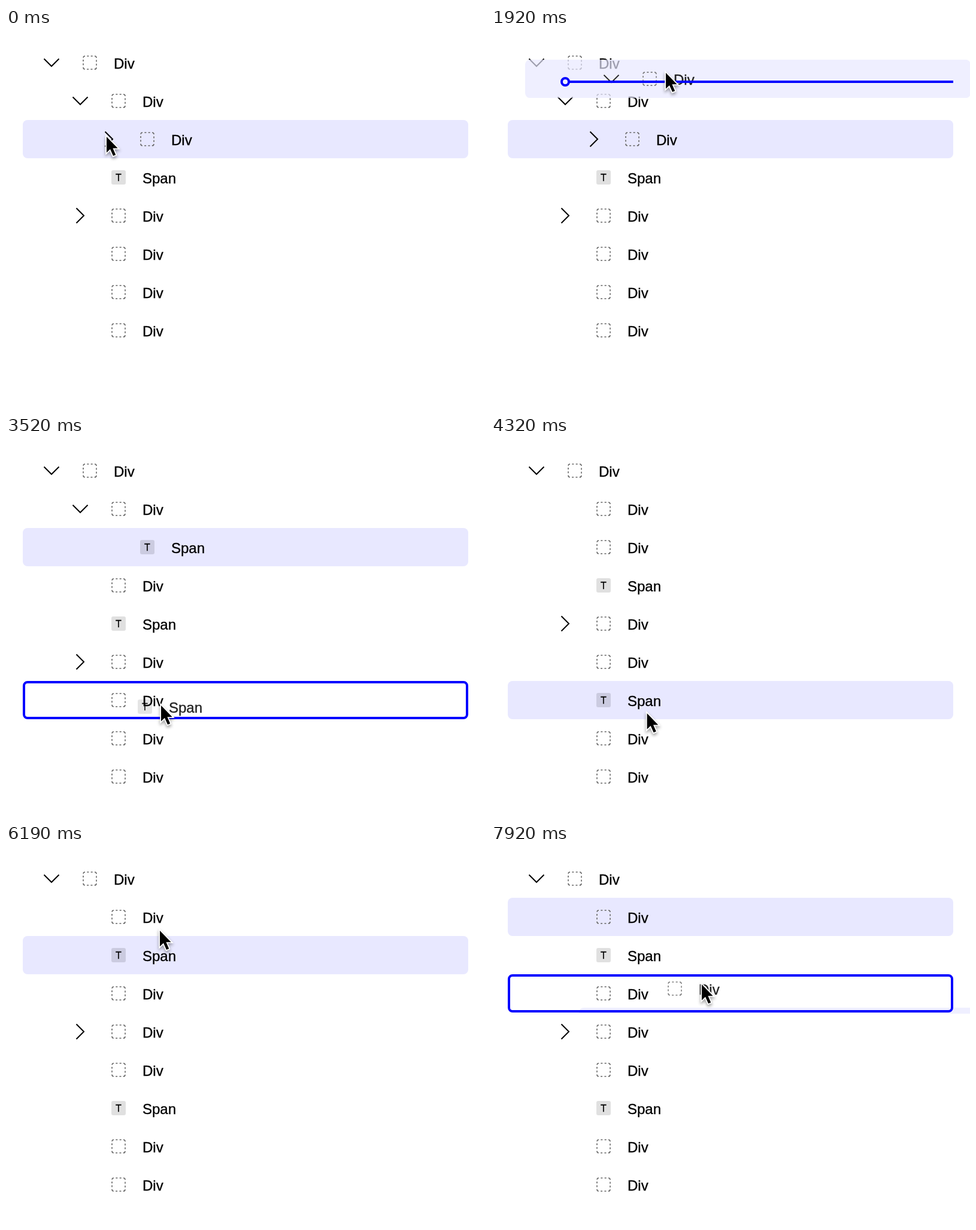
An HTML page with a canvas that plays this animation: 800x636 px, repeating every 7.99 s.

```html
<!DOCTYPE html>
<html lang="en">
<head>
<meta charset="utf-8">
<title>Tree drag and drop</title>
<style>
  html, body { margin: 0; width: 100%; height: 100%; overflow: hidden; background: #fff; }
  canvas { display: block; }
</style>
</head>
<body>
<canvas id="stage" width="800" height="636"></canvas>
<script>
const ctx = document.getElementById('stage').getContext('2d');
const LOOP = 7990, STEP = 200 / 3;
const ROW = 64, TOP = 26, LEFT = 28, WIDTH = 744, INDENT = 48;

// Each row: depth, chevron (v open, > closed, - none), kind (D or S)
const trees = [
  [0, '0vD 1vD 2>D 1-S 1>D 1-D 1-D 1-D'],
  [185, '0vD 1vD 2vD 3-S 1-S 1>D 1-D 1-D 1-D'],
  [1430, '0vD 1vD 2>D 1-S 1>D 1-D 1-D 1-D'],
  [2185, '0vD 1vD 2-S 1-D 1-S 1>D 1-D 1-D 1-D'],
  [4255, '0vD 1-D 1-D 1-S 1>D 1-D 1-S 1-D 1-D'],
  [6185, '0vD 1-D 1-S 1-D 1>D 1-D 1-S 1-D 1-D'],
].map(([time, rows]) => ({ time, rows: rows.split(' ') }));

// fade: milliseconds the highlight takes to move to the new row
const selections = [
  { time: 0, row: 2, fade: 1 },
  { time: 2185, row: 1, fade: 1 },
  { time: 3320, row: 2, fade: 200 },
  { time: 4255, row: 6, fade: 1 },
  { time: 5390, row: 3, fade: 200 },
  { time: 6185, row: 2, fade: 1 },
  { time: 7410, row: 1, fade: 200 },
];

// back: highlighted part of the drag image, as [offset from row top, height]
const drags = [
  { time: 1430, end: 2185, x: 262, y: 174, row: 2, node: '2vD', back: [0, 64] },
  { time: 3320, end: 4255, x: 262, y: 182, row: 2, node: '2-S' },
  { time: 5390, end: 6185, x: 253, y: 245, row: 3, node: '1-S' },
  { time: 7410, end: LOOP, x: 232, y: 113, row: 1, node: '1-D', back: [64, 10] },
];

const pointer = [
  [0, 167, 180], [190, 167, 180], [590, 262, 175], [1330, 262, 175], [1390, 260, 170],
  [1900, 291, 73], [2060, 291, 75], [2190, 291, 75], [2660, 264, 203], [2920, 262, 182],
  [3260, 262, 182], [3520, 258, 449], [3920, 260, 467], [4260, 260, 467], [4990, 242, 245],
  [5120, 240, 245], [5250, 240, 245], [5320, 253, 244], [5390, 253, 245], [5990, 256, 143],
  [6190, 256, 143], [6720, 238, 115], [6860, 238, 115], [7120, 232, 113], [7390, 232, 113],
  [7460, 280, 136], [7920, 351, 233], [LOOP, 351, 233],
];

const clamp = v => Math.max(0, Math.min(1, v));
const latest = (list, t) => list.findLastIndex(item => item.time <= t);
const rowTop = i => TOP + i * ROW;

function pointerAt(t) {
  const i = pointer.findIndex(p => p[0] > t);
  const [t0, x0, y0] = pointer[i - 1], [t1, x1, y1] = pointer[i];
  const k = clamp((t - t0) / (t1 - t0)), e = k * k * (3 - 2 * k);
  return { x: x0 + (x1 - x0) * e, y: y0 + (y1 - y0) * e };
}

function box(x, y, w, h, r) {
  ctx.beginPath();
  ctx.roundRect(x, y, w, h, r);
}

function highlight(y, alpha) {
  ctx.fillStyle = `rgba(232,232,255,${alpha})`;
  box(LEFT, y, WIDTH, ROW, 8);
  ctx.fill();
}

function label(text, x, y, size, align) {
  ctx.fillStyle = ctx.strokeStyle = '#000';
  ctx.lineWidth = 0.35;
  ctx.font = `${size}px "Liberation Sans", Arial, sans-serif`;
  ctx.textAlign = align;
  ctx.fillText(text, x, y);
  ctx.strokeText(text, x, y);
}

function chevron(x, y, open) {
  ctx.save();
  ctx.translate(x, y);
  if (!open) ctx.rotate(-Math.PI / 2);
  ctx.strokeStyle = '#000';
  ctx.lineWidth = 2;
  ctx.beginPath();
  ctx.moveTo(-12.5, -6.5);
  ctx.lineTo(0, 6);
  ctx.lineTo(12.5, -6.5);
  ctx.stroke();
  ctx.restore();
}

// Four rounded corners with two short dashes on each side between them
function dashedBox(x, y) {
  const radius = 3, corner = radius * Math.PI / 2, gap = 10 / 3;
  ctx.save();
  ctx.strokeStyle = '#666';
  ctx.lineWidth = 1.6;
  ctx.setLineDash([corner, gap, 3, gap, 3, gap]);
  ctx.lineDashOffset = corner;
  box(x + 1, y + 1, 22, 22, radius);
  ctx.stroke();
  ctx.restore();
}

function textBadge(x, y) {
  ctx.fillStyle = 'rgba(0,0,0,.12)';
  box(x, y, 24, 24, 3);
  ctx.fill();
  label('T', x + 12, y + 18, 16, 'center');
}

function node([depth, arrow, kind], top) {
  const shift = depth * INDENT, mid = top + ROW / 2;
  if (arrow !== '-') chevron(76 + shift, mid, arrow === 'v');
  (kind === 'S' ? textBadge : dashedBox)(128 + shift, mid - 12);
  label(kind === 'S' ? 'Span' : 'Div', 180 + shift, mid + 10, 24, 'left');
}

function dragImage(drag, t, p) {
  ctx.save();
  ctx.globalAlpha = 0.85 * clamp((t - drag.time) / 170);
  ctx.translate(p.x - drag.x, p.y - drag.y);
  const top = rowTop(drag.row);
  if (drag.back) {
    const [offset, height] = drag.back;
    ctx.save();
    ctx.beginPath();
    ctx.rect(0, top + offset, 800, height);
    ctx.clip();
    highlight(top + offset, 0.8);
    ctx.restore();
  }
  node(drag.node, top);
  ctx.restore();
}

// Outline the row under the pointer, or a line between rows near an edge
function dropTarget(drag, y) {
  const place = (y + 4 - TOP) / ROW, row = Math.floor(place), part = place - row;
  if (row === drag.row) return;
  ctx.strokeStyle = '#00f';
  ctx.lineWidth = 4;
  if (part > 0.25 && part < 0.75) {
    box(LEFT + 2, rowTop(row) + 2, WIDTH - 4, ROW - 4, 6);
  } else {
    const edge = rowTop(row + Math.round(part));
    ctx.beginPath();
    ctx.arc(124, edge, 6, 0, 7);
    ctx.moveTo(130, edge);
    ctx.lineTo(LEFT + WIDTH, edge);
  }
  ctx.stroke();
}

function shadow(blur, y, alpha) {
  ctx.shadowColor = `rgba(0,0,0,${alpha})`;
  ctx.shadowBlur = blur;
  ctx.shadowOffsetY = y;
}

function arrowPointer({ x, y }) {
  const shape = new Path2D('M0 0V26.5L6 20.8L11 32L15.2 30.2L10.4 19.2H18.6Z');
  ctx.save();
  ctx.translate(x + 1, y + 2);
  ctx.lineWidth = 3.6;
  ctx.strokeStyle = '#fff';
  shadow(5, 3, 0.4);
  ctx.stroke(shape);
  shadow(0, 0, 0);
  ctx.fillStyle = '#000';
  ctx.fill(shape);
  ctx.restore();
}

function copyBadge({ x, y }) {
  ctx.save();
  ctx.translate(x + 20, y + 46.5);
  const green = ctx.createLinearGradient(0, -18, 0, 18);
  green.addColorStop(0, '#0fc60f');
  green.addColorStop(1, '#009400');
  ctx.fillStyle = green;
  shadow(4, 2, 0.5);
  ctx.beginPath();
  ctx.arc(0, 0, 18.5, 0, 7);
  ctx.fill();
  shadow(0, 0, 0);
  ctx.fillStyle = '#fff';
  ctx.fillRect(-10, -2, 20, 4);
  ctx.fillRect(-2, -10, 4, 20);
  ctx.restore();
}

function draw(t) {
  ctx.fillStyle = '#fff';
  ctx.fillRect(0, 0, 800, 636);

  const s = latest(selections, t), now = selections[s];
  const shown = clamp((t - now.time) / now.fade);
  if (s > 0 && shown < 1) highlight(rowTop(selections[s - 1].row), 1 - shown);
  highlight(rowTop(now.row), s ? shown : 1);

  trees[latest(trees, t)].rows.forEach((row, i) => node(row, rowTop(i)));

  const p = pointerAt(t);
  const drag = drags.find(d => t >= d.time && t < d.end);
  const copying = drag && t - drag.time < 100;
  if (drag) {
    dragImage(drag, t, p);
    if (!copying) dropTarget(drag, p.y);
  }
  arrowPointer(p);
  if (copying) copyBadge(p);
}

// The picture advances 15 times per second
function tick() {
  const t = performance.now() % LOOP;
  draw(Math.max(0, Math.floor((t + 14) / STEP) * STEP - 10));
  requestAnimationFrame(tick);
}
tick();
</script>
</body>
</html>
```
